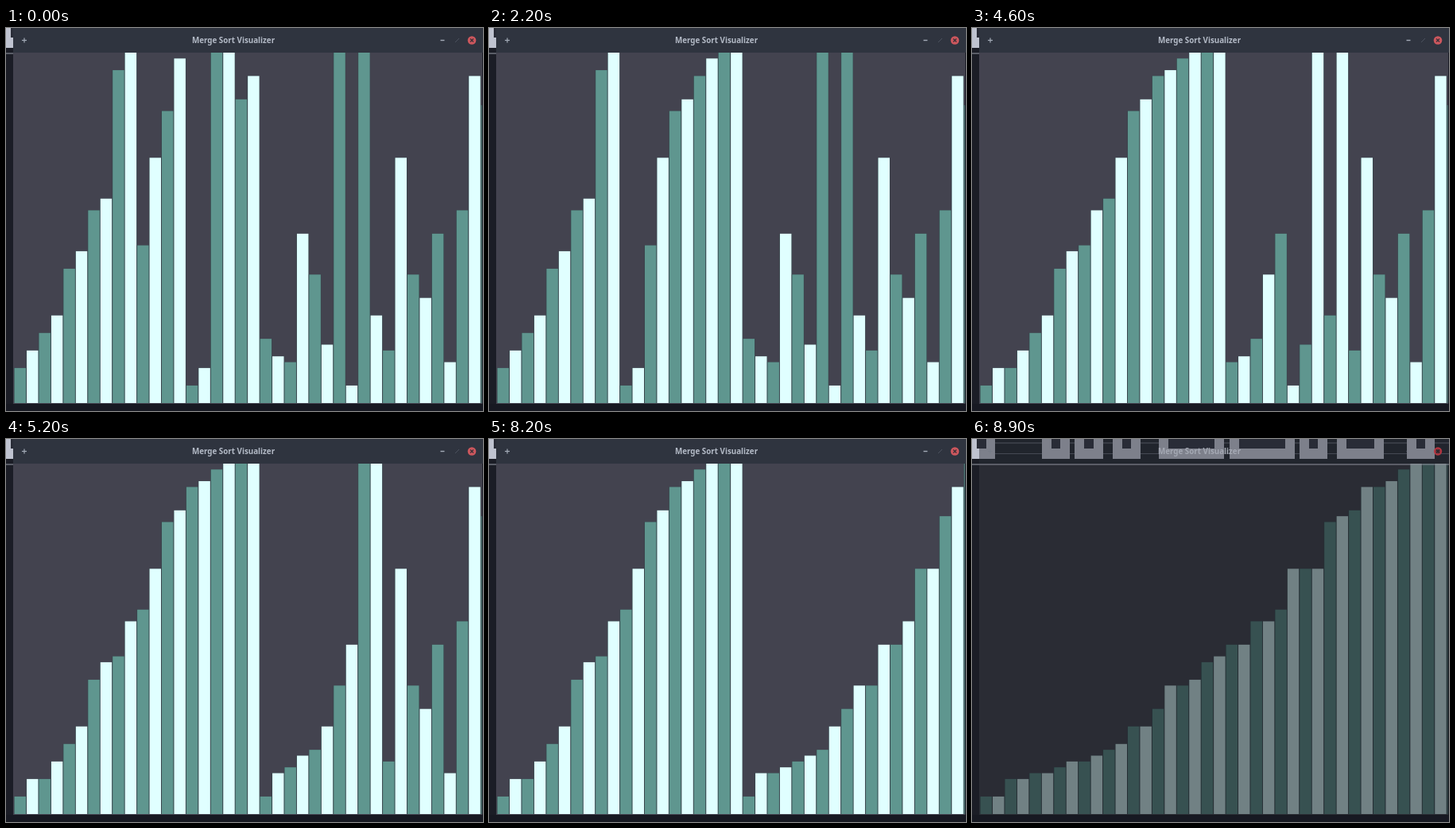
Animation of 600x482 px, one loop 9000 ms. Source, as an HTML page with a canvas:

```html
<!DOCTYPE html>
<html lang="en">
<head>
<meta charset="utf-8">
<title>Merge Sort Visualizer</title>
<style>
  html, body { margin: 0; width: 100%; height: 100%; overflow: hidden; background: #171922; }
  canvas { display: block; }
</style>
</head>
<body>
<canvas id="stage" width="600" height="482"></canvas>
<script>
const ctx = document.getElementById('stage').getContext('2d');
const LOOP = 9000, FADE_AT = 8900;
const FIRST_MERGE = 6, MERGE_GAP = 314, MERGES_DONE = 11;
const LEFT = 10, TOP = 31, BASE = 472, PITCH = 15.45, UNIT = 7.35;

const values = [
  6, 9, 12, 15, 23, 26, 33, 35, 57, 60, 27, 42, 50, 59, 3, 6, 60, 60, 52, 56,
  11, 8, 7, 29, 22, 10, 60, 3, 60, 15, 9, 42, 22, 18, 29, 7, 33, 56, 51, 42
];

// One snapshot of the array after every merge.
const snapshots = [values.slice()];
function mergeSort(lo, hi) {
  if (lo >= hi) return;
  const mid = (lo + hi) >> 1;
  mergeSort(lo, mid);
  mergeSort(mid + 1, hi);
  const merged = values.slice(lo, hi + 1).sort((a, b) => a - b);
  values.splice(lo, merged.length, ...merged);
  snapshots.push(values.slice());
}
mergeSort(0, values.length - 1);

function rect(x, y, w, h, color) {
  ctx.fillStyle = color;
  ctx.fillRect(x, y, w, h);
}

function line(color, width, ...points) {
  ctx.strokeStyle = color;
  ctx.lineWidth = width;
  ctx.beginPath();
  points.forEach(([x, y]) => ctx.lineTo(x, y));
  ctx.stroke();
}

function disc(x, y, r, color) {
  ctx.fillStyle = color;
  ctx.beginPath();
  ctx.arc(x, y, r, 0, 2 * Math.PI);
  ctx.fill();
}

function drawDesktop() {
  rect(0, 0, 600, 482, '#1b1d26');
  rect(0, 473, 600, 9, '#171922');
  rect(0, 0, 9, 25, '#bfc3d0');
  rect(6, 0, 3, 12, '#2a2d38');
  rect(0, 31.5, 9, 1, '#9a9da8');
}

function drawWindow() {
  rect(9, 0, 591, 31, '#2f343f');
  rect(9, TOP, 590, BASE - TOP + 1, '#43434f');

  ctx.font = 'bold 9.8px "Noto Sans", sans-serif';
  ctx.textAlign = 'center';
  ctx.fillStyle = '#b3bac6';
  ctx.fillText('Merge Sort Visualizer', 286, 19);

  line('#a4abb8', 1.2, [20, 15.5], [26, 15.5]);
  line('#a4abb8', 1.2, [23, 12.5], [23, 18.5]);
  line('#a4abb8', 1.4, [546.5, 15.5], [551.5, 15.5]);
  line('#4c525e', 1, [565, 18], [570, 13]);
  disc(586, 15.5, 5.3, '#cc575d');
  line('#3a3038', 1.2, [584, 13.5], [588, 17.5]);
  line('#3a3038', 1.2, [588, 13.5], [584, 17.5]);
}

function drawBars(heights) {
  ctx.save();
  ctx.beginPath();
  ctx.rect(LEFT, TOP, 589 - 0.5, BASE - TOP);
  ctx.clip();
  heights.forEach((value, i) => {
    const height = value * UNIT;
    const x = LEFT + i * PITCH;
    rect(x, BASE - height, PITCH, height, '#35474c');
    rect(x + 0.6, BASE - height, PITCH - 1, height, i % 2 ? '#e0ffff' : '#5f968f');
  });
  ctx.restore();
}

// The terminal behind shows through as the window fades out.
function drawFade() {
  rect(9, 0, 591, 474, 'rgba(22, 26, 32, 0.55)');
  const block = '#7d808b', hole = '#292c37';
  rect(9, 4.5, 591, 1, '#50545f');
  rect(9, 18, 591, 1, '#454954');
  rect(9, 0, 20, 25, block);
  rect(9, 0, 9, 12, hole);
  const blocks = [[88, 35], [129, 36], [177, 35], [235, 82], [324, 82], [412, 35], [459, 59], [547, 35]];
  for (const [x, w] of blocks) {
    rect(x, 0, w, 25, block);
    rect(x + 12, 0, w - 24, 12, hole);
  }
  ctx.fillStyle = '#a4a8b3';
  ctx.fillText('Merge Sort Visualizer', 286, 19);
  rect(9, 31.5, 591, 1, '#8b8e99');
  line('#777c87', 1, [20, 15.5], [26, 15.5]);
  line('#777c87', 1, [23, 12.5], [23, 18.5]);
  ctx.strokeStyle = '#b5343f';
  ctx.lineWidth = 2;
  ctx.beginPath();
  ctx.arc(586, 15.5, 4, 0, 2 * Math.PI);
  ctx.stroke();
}

function draw(now) {
  const t = now % LOOP;
  const merges = MERGES_DONE + 1 + Math.floor((t - FIRST_MERGE) / MERGE_GAP);
  drawDesktop();
  drawWindow();
  drawBars(snapshots[Math.min(merges, snapshots.length - 1)]);
  if (t >= FADE_AT) drawFade();
}

const start = performance.now();
function tick() {
  draw(performance.now() - start);
  requestAnimationFrame(tick);
}
tick();
</script>
</body>
</html>
```
